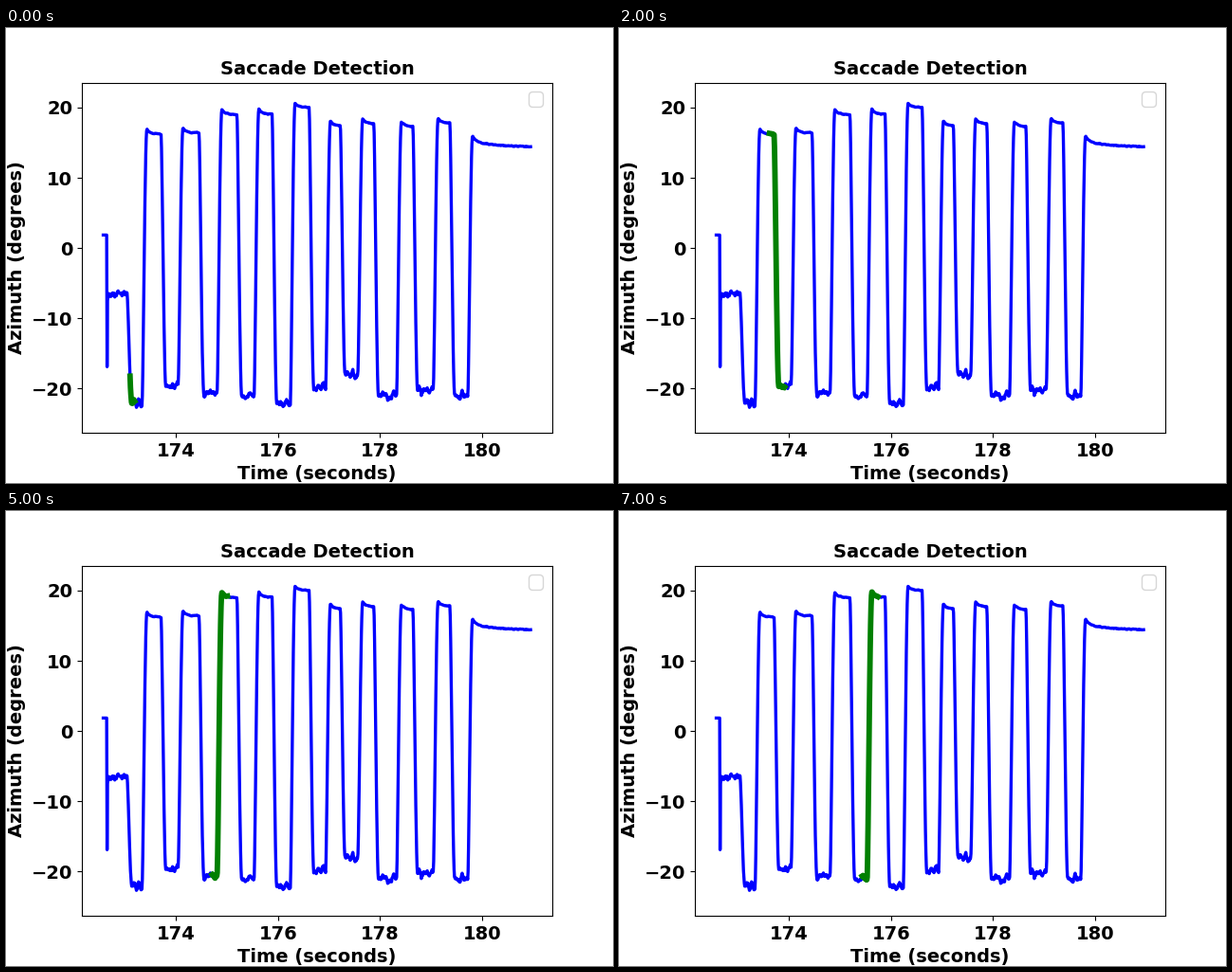
These frames come from a looping animation (640x480 px, 8 s). A matplotlib script:

```python
import numpy as np
import matplotlib.pyplot as plt
from matplotlib.animation import FuncAnimation

plt.rcParams.update({"font.family": "DejaVu Sans", "font.weight": "bold",
                     "font.size": 14, "axes.labelweight": "bold",
                     "axes.titleweight": "bold", "axes.titlesize": 14,
                     "text.kerning_factor": 6})

START, END, RATE = 172.575, 180.957, 120
SPIKE = 172.65
JUMP = 0.095          # seconds one eye movement takes

# Fall time, low level, rise time, high level of each cycle.
CYCLES = [
    (173.040, -21.9, 173.336, 16.2),
    (173.708, -19.7, 174.043, 16.4),
    (174.452, -20.9, 174.805, 19.0),
    (175.195, -21.2, 175.530, 19.1),
    (175.883, -22.1, 176.240, 20.0),
    (176.609, -20.0, 176.933, 17.4),
    (177.221, -18.1, 177.565, 17.7),
    (177.877, -21.0, 178.323, 17.3),
    (178.643, -20.2, 179.043, 17.8),
    (179.368, -21.1, 179.718, 14.4),
]


def ease(s):
    u = np.clip(s / JUMP, 0, 1)
    return np.sin(np.pi / 2 * u ** 0.8) ** 2


def decay(s, tau):
    return np.exp(-np.maximum(s, 0) / tau)


def build_trace():
    t = np.arange(START, END, 1 / RATE)
    rng = np.random.default_rng(4)
    noise = np.convolve(rng.normal(0, 0.7, t.size), np.ones(5) / 5, "same")
    y = np.where(t < SPIKE, 1.85,
                 -6.4 - 1.6 * decay(t - SPIKE, 0.03) + noise)
    y[np.argmin(abs(t - SPIKE))] = -16.9
    for fall, low, rise, high in CYCLES:
        y += (low + noise - y) * ease(t - fall)
        crest = high + 0.7 * decay(t - rise - JUMP, 0.06) + 0.1 * noise
        y += (crest - y) * ease(t - rise)
    # After the last rise the eye settles slowly.
    y += 1.1 * ease(t - rise) * decay(t - rise, 0.4)
    return t, y


t, y = build_trace()

fig, ax = plt.subplots(figsize=(6.4, 4.8), dpi=100)
ax.plot(t, y, color="blue", lw=2.4)
window, = ax.plot([], [], color="green", lw=4.2)
ax.set_xlim(172.156, 181.375)
ax.set_ylim(-26.33, 23.55)
ax.set_xticks(range(174, 181, 2))
ax.set_yticks(range(-20, 21, 10))
ax.set_title("Saccade Detection")
ax.set_xlabel("Time (seconds)")
ax.set_ylabel("Azimuth (degrees)")
ax.legend(handles=[], loc="upper right")


def update(i):
    lo = 172.883 + 0.3643 * i
    shown = (t >= max(lo, 173.095)) & (t <= lo + 0.309)
    window.set_data(t[shown], y[shown])
    return window,


anim = FuncAnimation(fig, update, frames=8, interval=1000, repeat=True)
plt.show()
```
